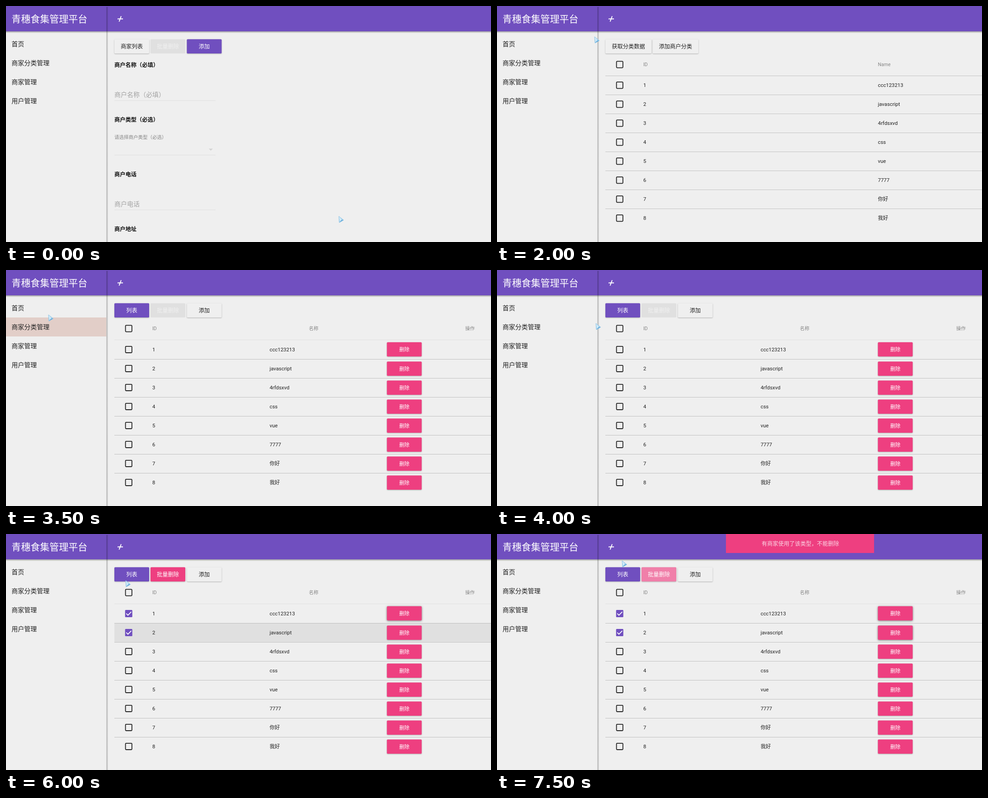
Recreate the animation shown at these times as an HTML page. Size 1074 px wide and 522 px high, loop 8000 ms.

```html
<!DOCTYPE html>
<html lang="zh-CN">
<head>
<meta charset="utf-8">
<title>管理平台</title>
<style>
html, body { margin: 0; width: 100%; height: 100%; overflow: hidden; background: #efefef; }
svg { display: block; width: 100vw; height: 100vh; }
text { font-family: Roboto, "Noto Sans CJK SC", "Noto Sans CJK", sans-serif; white-space: pre; }
.raised { filter: drop-shadow(0 1px 1px rgba(0,0,0,.27)); }
.lifted { filter: drop-shadow(0 1px 2px rgba(0,0,0,.5)); }
</style>
</head>
<body>
<svg viewBox="0 0 1074 522" preserveAspectRatio="none">
  <defs>
    <linearGradient id="down" x2="0" y2="1">
      <stop offset="0" stop-opacity=".34"/><stop offset="1" stop-opacity="0"/>
    </linearGradient>
    <linearGradient id="side">
      <stop offset="0" stop-opacity=".3"/><stop offset="1" stop-opacity="0"/>
    </linearGradient>
    <linearGradient id="ice" x2="1" y2="1">
      <stop offset="0" stop-color="#e2f3fb"/><stop offset=".5" stop-color="#b4dcf3"/><stop offset="1" stop-color="#5ea6d8"/>
    </linearGradient>
  </defs>
  <g id="scene"></g>
  <g id="cursor">
    <path d="M1 1L11.5 9.5L2 15Z" fill="url(#ice)" stroke="#8fc3e4" stroke-linejoin="round"/>
    <path d="M2 15L11.5 9.5L7 9Z" fill="#6aaedb"/>
    <path d="M3 4.5L7 9L3.5 11.5Z" fill="#d4edfa"/>
  </g>
</svg>
<script>
const STEP = 500;
const PURPLE = '#704fbf', PINK = '#ee3f80', INK = '#212121', BG = '#efefef', HOVER = '#e0e0e0';
const NAV = ['首页', '商家分类管理', '商家管理', '用户管理'];
const KINDS = ['ccc123213', 'javascript', '4rfdsxvd', 'css', 'vue', '7777', '你好', '我好'];

// One entry per step; cursor is [x, y]
const STEPS = [
  { page: form, cursor: [736, 464] },
  { page: form, cursor: [149, 124] },
  { page: form, cursor: [64, 63], nav: 0 },
  { page: home, cursor: [212, 75], empty: true },
  { page: home, cursor: [215, 67] },
  { page: home, cursor: [218, 71] },
  { page: home, cursor: [77, 90], nav: 1 },
  { page: list, cursor: [93, 98], nav: 1, pressed: true },
  { page: list, cursor: [218, 117] },
  { page: list, cursor: [218, 134], picked: 1, row: 0 },
  { page: list, cursor: [218, 162], picked: 1, row: 1 },
  { page: list, cursor: [218, 162], picked: 2, row: 1, batch: '#e890b0' },
  { page: list, cursor: [264, 102], picked: 2, row: 1, batch: PINK },
  { page: list, cursor: [276, 59], picked: 2, batch: PINK },
  { page: list, cursor: [276, 58], picked: 2, batch: PINK },
  { page: list, cursor: [276, 58], picked: 2, batch: '#f07fa9', toast: true }
];

const rect = (x, y, w, h, fill, extra = '') =>
  `<rect x="${x}" y="${y}" width="${w}" height="${h}" fill="${fill}" ${extra}/>`;

// y is the optical middle of the line
const text = (x, y, size, str, fill = INK, extra = '') =>
  `<text x="${x}" y="${y + size * .37}" font-size="${size}" fill="${fill}" ${extra}>${str}</text>`;

const rule = (y, color, x2 = 1074) => rect(240, y, x2 - 240, 1, color);

function button(x, y, w, label, { fill = BG, color = INK, size = 12.25, cls = 'raised', weight = 400 } = {}) {
  return rect(x, y, w, 31.5, fill, `rx="1.75" class="${cls}"`) +
    text(x + w / 2, y + 16, size, label, color, `text-anchor="middle" font-weight="${weight}"`);
}

function checkbox(y, on) {
  const box = `x="${on ? 263.7 : 264.6}" y="${on ? y - 8 : y - 7.1}" rx="1.5"`;
  return on
    ? `<rect ${box} width="16" height="16" fill="${PURPLE}"/>
       <path d="M266.3 ${y}L270 ${y + 3.7}L277.4 ${y - 3.8}" fill="none" stroke="#fff" stroke-width="1.8"/>`
    : `<rect ${box} width="14.2" height="14.2" fill="none" stroke="${INK}" stroke-width="1.8"/>`;
}

function toolbar(first, active, batch) {
  const style = on => on ? { fill: PURPLE, color: '#fff' } : {};
  return button(240, 73.5, 77, first, style(active === 0)) +
    button(320, 73.5, 77, '批量删除', batch
      ? { fill: batch, color: '#fff' }
      : { fill: HOVER, color: '#f0f0f0', cls: '' }) +
    button(400.5, 73.5, 77, '添加', style(active === 2));
}

function form() {
  const head = (y, str) => text(240, y, 12.25, str, '#111', 'font-weight="700"');
  const field = (y, str) => text(240, y, 14, str, '#a3a3a3') + rule(y + 12.5, '#dfdfdf', 464);
  return toolbar('商家列表', 2) +
    head(130.5, '商户名称（必填）') + field(196.3, '商户名称（必填）') +
    head(251.5, '商户类型（必选）') +
    text(240, 290, 10.5, '请选择商户类型（必选）', '#858585') +
    '<path d="M449 315.5h9l-4.500 4.500z" fill="#d3d3d3"/>' + rule(329.3, '#dfdfdf', 464) +
    head(372, '商户电话') + field(438, '商户电话') +
    head(493, '商户地址');
}

function tableHead(columns) {
  return checkbox(129.5) + columns.map(([x, str]) => text(x, 129.3, 10.5, str, '#858585')).join('');
}

function home({ empty }) {
  let out = button(240, 73.5, 102, '获取分类数据') + button(344.5, 73.5, 101.5, '添加商户分类') +
    tableHead([[324, 'ID'], [843.5, 'Name']]) + rule(154, empty ? '#e0e0e0' : '#c3c3c3');
  if (empty) return out;
  KINDS.forEach((kind, i) => {
    const y = 175 + 42 * i;
    if (i) out += rule(y - 21, '#c3c3c3');
    out += checkbox(y + .2) + text(324, y, 11.375, i + 1) + text(843.5, y, 11.375, kind);
  });
  return out;
}

function list({ picked = 0, row, batch }) {
  let out = toolbar('列表', 0, batch) +
    tableHead([[324, 'ID'], [670.7, '名称'], [1017, '操作']]) + rule(154, '#e0e0e0');
  KINDS.forEach((kind, i) => {
    const y = 175.7 + 42 * i, on = i < picked;
    if (i === row) out += rect(240, y - 21, 834, 42, HOVER);
    if (i) out += rule(Math.floor(y - 20.7), '#c0c0c0');
    out += checkbox(y + .2, on) + text(324, y, 11.375, i + 1) + text(583.7, y, 11.375, kind) +
      button(843.5, i ? y - 15.2 : 159.7, 77, '删除', {
        fill: PINK, color: '#fff', size: 11.375, weight: 500,
        cls: on && i !== row ? 'lifted' : 'raised'
      });
  });
  return out;
}

function frame({ nav, pressed, toast }) {
  let out = '';
  if (nav !== undefined) out += rect(0, 63 + 42 * nav, 222, 42, pressed ? '#e2cec8' : HOVER);
  NAV.forEach((str, i) => out += text(12.3, 84.3 + 42 * i, 14, str));
  out += rect(0, 56, 1074, 4, 'url(#down)') + rect(0, 0, 1074, 56, PURPLE) +
    rect(222.5, 2, 4, 520, 'url(#side)') +
    text(12.3, 28, 21, '青穗食集管理平台', '#fff') +
    '<path d="M247 28.500H259M255 22.500L250.500 34.500" stroke="#fff" stroke-width="2" fill="none"/>';
  if (toast) {
    out += rect(507, 0, 328, 42, PINK) +
      text(586, 21, 12.25, '有商家使用了该类型，不能删除', '#fbd5e3');
  }
  return out;
}

const scene = document.getElementById('scene');
const cursor = document.getElementById('cursor');
let shown = -1;

function update(now) {
  const i = Math.floor(now / STEP) % STEPS.length;
  if (i !== shown) {
    const state = STEPS[i];
    shown = i;
    scene.innerHTML = rect(0, 0, 1074, 522, BG) + state.page(state) + frame(state);
    cursor.setAttribute('transform', `translate(${state.cursor})`);
  }
}

const start = performance.now();
function tick() {
  update(performance.now() - start);
  requestAnimationFrame(tick);
}
tick();
</script>
</body>
</html>
```
